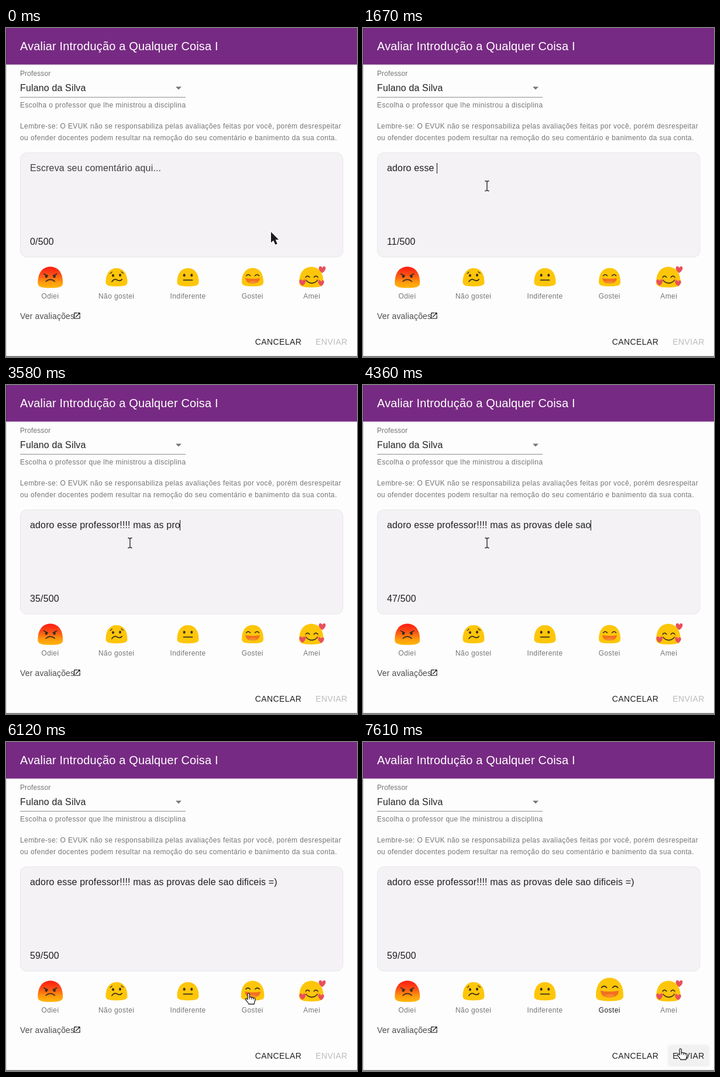
Animation, 600 px wide and 563 px high, one loop 7670 ms. Source, as an HTML page with a canvas:

```html
<!DOCTYPE html>
<html lang="pt">
<head>
<meta charset="utf-8">
<title>Avaliar disciplina</title>
<style>
html, body { margin: 0; width: 100%; height: 100%; overflow: hidden; background: #fefdfe; }
canvas { display: block; width: 600px; height: 563px; }
</style>
</head>
<body>
<canvas id="stage"></canvas>
<script>
const W = 600, H = 563, LOOP = 7670;
const FONT = '"Liberation Sans", Arial, sans-serif';
const YELLOW = '#fdc60a', DARK = '#3a2d20', HEART = '#e8505b';
const INK = 'rgba(0,0,0,.87)', MUTED = 'rgba(0,0,0,.54)';
const COMMENT = 'adoro esse professor!!!! mas as provas dele sao dificeis =)';

// [time, value...] keys
const TYPING = [[870, 0], [930, 1], [2500, 23], [2590, 24], [2830, 25], [3560, 35], [5060, 59]];
const POINTER = [[30, 453, 349], [620, 212, 270], [5230, 212, 270], [5900, 415, 430], [6360, 415, 430], [7000, 543, 525]];
const GROWTH = [[5780, 1], [5930, 1.07], [6180, 1.07], [6400, 1.27]];
const HOVER = [[6900, 0], [7100, 1]];
const FOCUS = 680, TYPED = 5060, CLICK = 6180, BLINK = 530;

const canvas = document.getElementById('stage');
const ctx = canvas.getContext('2d');
const dpr = window.devicePixelRatio || 1;
canvas.width = W * dpr;
canvas.height = H * dpr;

const smooth = k => k * k * (3 - 2 * k);
const linear = k => k;

function track(keys, t, ease = smooth) {
  if (t <= keys[0][0]) return keys[0].slice(1);
  for (let i = 1; i < keys.length; i++) {
    const a = keys[i - 1], b = keys[i];
    if (t < b[0]) {
      const k = ease((t - a[0]) / (b[0] - a[0]));
      return a.slice(1).map((v, j) => v + (b[j + 1] - v) * k);
    }
  }
  return keys[keys.length - 1].slice(1);
}

function text(str, x, y, size, color, spacing = 0.15) {
  ctx.font = size + 'px ' + FONT;
  ctx.letterSpacing = spacing + 'px';
  ctx.fillStyle = color;
  ctx.fillText(str, x, y);
  return ctx.measureText(str).width;
}

function rect(x, y, w, h, color) {
  ctx.fillStyle = color;
  ctx.fillRect(x, y, w, h);
}

function fill(d, color) {
  ctx.fillStyle = color;
  ctx.fill(new Path2D(d));
}

function stroke(d, color, width) {
  ctx.strokeStyle = color;
  ctx.lineWidth = width;
  ctx.lineCap = ctx.lineJoin = 'round';
  ctx.stroke(new Path2D(d));
}

function at(x, y, scale, draw) {
  ctx.save();
  ctx.translate(x, y);
  ctx.scale(scale, scale);
  draw();
  ctx.restore();
}

function dot(x, y, rx, ry, color) {
  ctx.fillStyle = color;
  ctx.beginPath();
  ctx.ellipse(x, y, rx, ry, 0, 0, 7);
  ctx.fill();
}

function blob(color) {
  fill('M-18.5 8.5C-18.5-8-10.5-15.7 0-15.7S18.5-8 18.5 8.5C18.5 14 13 15.7 0 15.7S-18.5 14-18.5 8.5Z', color);
}

function heart(x, y, scale) {
  at(x, y, scale, () => fill('M0 4.5C-7-.5-4.5-5 -2-4.4Q-.4-4 0-2.4Q.8-4.4 2.5-4.4C5.6-4 5.2 1 0 4.5Z', HEART));
}

function angry() {
  const g = ctx.createLinearGradient(0, -16, 0, 16);
  g.addColorStop(0, '#ff1a10');
  g.addColorStop(0.35, '#fb4a16');
  g.addColorStop(0.75, '#ff9d0c');
  g.addColorStop(1, '#ffb70a');
  blob(g);
  dot(-6, -1.3, 1.9, 2.2, DARK);
  dot(6, -1.3, 1.9, 2.2, DARK);
  stroke('M-9.5-5L-3.8-2.3M9.5-5L3.8-2.3M-6.5 6Q0 .6 6.5 6', DARK, 1.5);
}

function sad() {
  blob(YELLOW);
  dot(-6, -3, 2, 2.4, DARK);
  dot(6, -3.6, 2, 2.4, DARK);
  stroke('M-11-6.5Q-9-7.3-7.8-9.2M7.8-9.8Q9-7.6 11.5-7', DARK, 1.2);
  stroke('M-8 7.5Q-4 1.7 1 4.6T9.2 3.5', DARK, 1.7);
}

function neutral() {
  blob(YELLOW);
  dot(-6.3, -3.5, 2, 2.5, DARK);
  dot(6.3, -3.5, 2, 2.5, DARK);
  stroke('M-7.5 4.7H7.5', DARK, 1.8);
}

function happy() {
  blob(YELLOW);
  stroke('M-11-2.5Q-7.5-6.5-4-2.5M4-2.5Q7.5-6.5 11-2.5', DARK, 1.5);
  fill('M-12.5 1.5Q0 4 12.5 1.5Q11.5 10.8 0 10.8T-12.5 1.5Z', '#f2701f');
  fill('M-7.5 8.3Q0 4.5 7.5 8.3Q4.5 10.8 0 10.8T-7.5 8.3Z', '#f78a2c');
}

function loving() {
  at(-1.5, 0, 1.08, () => blob(YELLOW));
  dot(-11, 4, 3, 2, '#fbaa1c');
  dot(9, 4, 3, 2, '#fbaa1c');
  stroke('M-10.8 .2Q-7.7-4-4.5 .2M2.8 .2Q6-4 9.2 .2M-10 5.5Q-.8 14.5 8.5 5.5', DARK, 1.6);
  heart(16.5, -12.3, 1.25);
  heart(-16, 9, 1.15);
  heart(14.6, 10, 1.1);
}

function arrow() {
  const d = 'M0 0V18.2L4.2 14.4L7.4 21.7L10.8 20.2L7.6 13.2H13.2Z';
  stroke(d, '#fff', 2.2);
  fill(d, '#1c1c1c');
}

function beam() {
  const d = 'M-3.2-8.2Q0-8.2 0-6.8Q0-8.2 3.2-8.2M0-7V7.5M-3.2 8.7Q0 8.7 0 7.3Q0 8.7 3.2 8.7';
  stroke(d, '#fff', 3);
  stroke(d, '#222', 1.4);
}

function hand() {
  const d = 'M-2 1.2C-2-.6 1.2-.6 1.2 1.2V7Q3.4 5.7 4.6 7.3Q6.7 6.3 7.8 8.2Q11 7.5 11 10.2C11 13.8 9.4 14.5 9.2 18.5H-.2C-.4 15.4-4.6 13.8-5.4 10.6C-5.6 8.7-3.4 8.8-2 10.6Z';
  fill(d, '#fff');
  stroke(d, '#222', 1.3);
  stroke('M1.2 7V10M4.6 7.6V10.3M7.8 8.5V10.8', '#222', 1);
}

function frame() {
  rect(0, 0, W, H, '#fefdfe');
  rect(0, 0, W, 62.6, '#772a83');
  rect(0, 0, 1, 62.6, '#5b2a66');
  rect(0, 62.6, 1, H, '#d2d0d3');
  rect(0, 561.5, W, 1.5, '#69666b');
  text('Avaliar Introdução a Qualquer Coisa I', 24, 37.5, 20, '#fff');
}

function form() {
  text('Professor', 24, 81.7, 12, MUTED, 0.11);
  text('Fulano da Silva', 24, 107.7, 16, INK);
  fill('M290 100.5H300L295 105.5Z', '#757575');
  rect(24, 118, 283, 1, '#8f8e90');
  text('Escolha o professor que lhe ministrou a disciplina', 24, 136, 12, MUTED, 0.4);
  text('Lembre-se: O EVUK não se responsabiliza pelas avaliações feitas por você, porém desrespeitar', 24, 172, 12, MUTED, 0.4);
  text('ou ofender docentes podem resultar na remoção do seu comentário e banimento da sua conta.', 24, 191.5, 12, MUTED, 0.4);
}

function comment(t) {
  ctx.beginPath();
  ctx.roundRect(24.5, 213.5, 551.5, 178.5, 11);
  ctx.fillStyle = '#f4f2f5';
  ctx.fill();
  ctx.strokeStyle = '#e7e5e9';
  ctx.lineWidth = 1;
  ctx.stroke();

  const count = Math.floor(track(TYPING, t, linear)[0]);
  let width = 0;
  if (count) width = text(COMMENT.slice(0, count), 41, 245, 16, INK);
  else text('Escreva seu comentário aqui...', 41, 245, 16, 'rgba(0,0,0,.74)');
  text(count + '/500', 41, 370.7, 16, INK);

  const lit = t < TYPED || (t - TYPED) % (2 * BLINK) < BLINK;
  if (t >= FOCUS && t < 6120 && lit) rect(Math.round(41 + width - 0.6), 231, 1, 18, '#111');
}

function ratings(t) {
  at(75.8, 426.6, 1.16, angry);
  at(189, 426.6, 1, sad);
  at(311, 426.6, 1, neutral);
  const s = track(GROWTH, t)[0];
  at(421.6, 437 - 10.6 * s, s, happy);
  at(523.5, 426.3, 1.04, loving);

  const labels = [['Odiei', 60.5], ['Não gostei', 158], ['Indiferente', 280.5], ['Gostei', 402.7], ['Amei', 508.3]];
  for (const [name, x] of labels) {
    text(name, x, 463, 12, name === 'Gostei' && t >= CLICK ? INK : MUTED, 0.4);
  }
}

function footer(t) {
  text('Ver avaliações', 24, 498, 14, 'rgba(0,0,0,.7)');
  at(114.5, 485.3, 0.583, () => {
    stroke('M11.5 4H4V20H20V12.5', '#111', 2);
    stroke('M14.5 4H20V9.5M19.5 4.5L8.7 15.3', '#111', 2);
  });
  text('CANCELAR', 425.7, 542, 14, INK, 0.4);

  const hover = track(HOVER, t)[0];
  if (hover) {
    ctx.save();
    ctx.globalAlpha = hover;
    ctx.shadowColor = 'rgba(0,0,0,.08)';
    ctx.shadowBlur = 4 * dpr;
    ctx.beginPath();
    ctx.roundRect(522, 519, 69, 35.5, 4);
    ctx.fillStyle = '#f2f1f2';
    ctx.fill();
    ctx.restore();
  }
  text('ENVIAR', 529.3, 542, 14, t >= CLICK ? INK : 'rgba(0,0,0,.26)', 0.4);
}

function pointer(t) {
  const [x, y] = track(POINTER, t);
  const overField = y < 345;
  const overFace = y > 405 && y < 468 && x > 395 && x < 448;
  const overSend = x > 521 && y > 518;
  at(x, y, 1, overField ? beam : overFace || overSend ? hand : arrow);
}

function draw(t) {
  ctx.setTransform(dpr, 0, 0, dpr, 0, 0);
  frame();
  form();
  comment(t);
  ratings(t);
  footer(t);
  pointer(t);
}

const start = performance.now();
function tick() {
  draw((performance.now() - start) % LOOP);
  requestAnimationFrame(tick);
}
tick();
</script>
</body>
</html>
```
